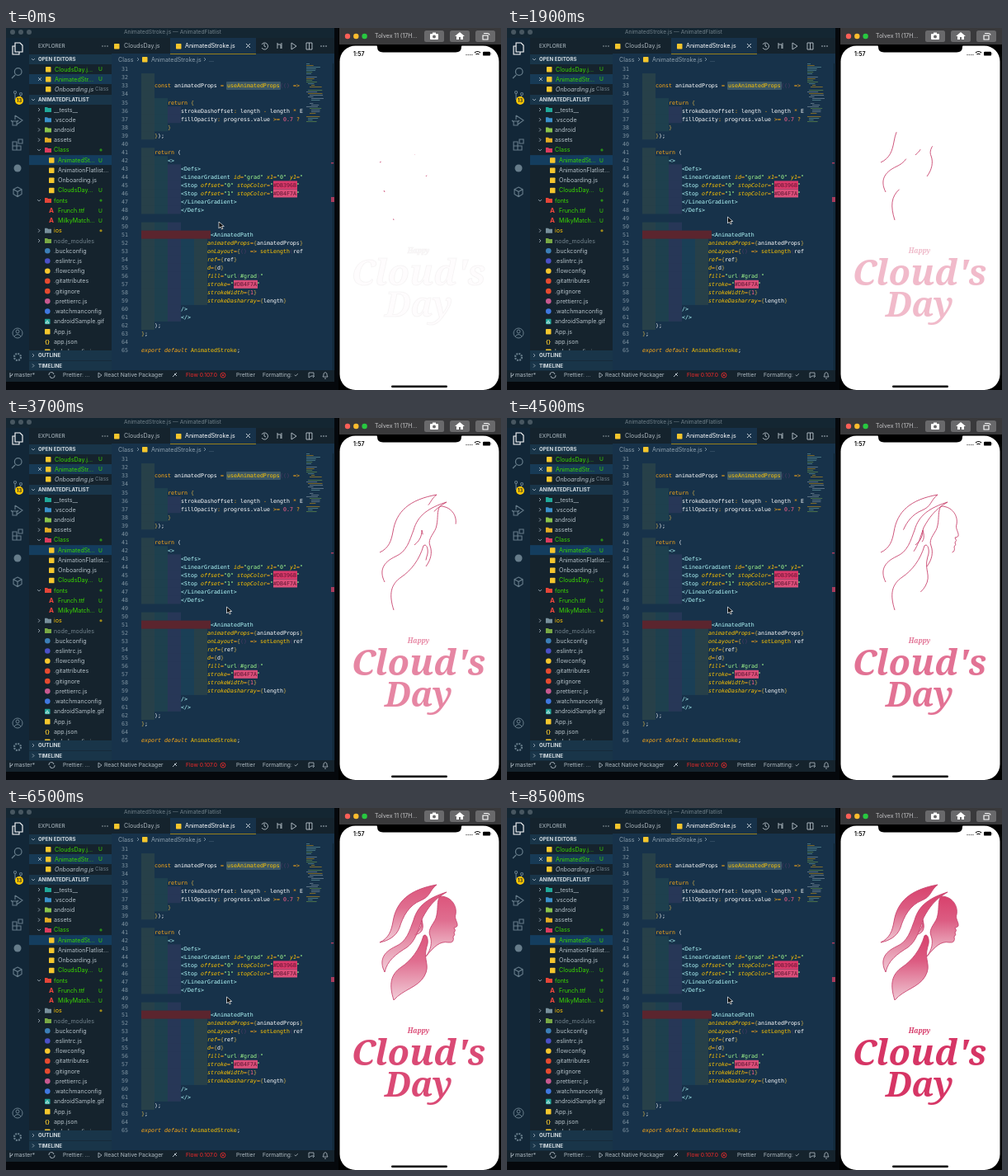
An HTML page that plays this animation: 600x439 px, repeating every 8600 ms.

```html
<!DOCTYPE html>
<html lang="en">
<head>
<meta charset="utf-8">
<title>Stroke animation</title>
<style>
  html, body { margin: 0; width: 100%; height: 100%; overflow: hidden; background: #05080c; }
  svg { display: block; width: 100vw; height: 100vh; }
  text { font-family: Inter, sans-serif; white-space: pre; }
  .code { font-family: "DejaVu Sans Mono", monospace; }
  .script { font-family: "Noto Serif", serif; font-style: italic; font-weight: 900; text-anchor: middle; }
</style>
</head>
<body>
<svg id="stage" viewBox="0 0 600 439">
  <defs>
    <linearGradient id="grad" x1="0" y1="0" x2="0" y2="1">
      <stop offset="0" stop-color="#d8416c"/>
      <stop offset=".4" stop-color="#dc5c82"/>
      <stop offset="1" stop-color="#f0c8d4"/>
    </linearGradient>
    <clipPath id="codeClip"><path d="M128 43H360V415H128z"/></clipPath>
  </defs>
</svg>
<script>
const LOOP = 8600, STEP = 100;
const stage = document.getElementById('stage');

function el(tag, attrs, parent = stage) {
  const node = document.createElementNS(stage.namespaceURI, tag);
  for (const key in attrs) node.setAttribute(key, attrs[key]);
  return parent.appendChild(node);
}
const rect = (x, y, width, height, fill, rx = 0, parent) =>
  el('rect', { x, y, width, height, fill, rx }, parent);
const dot = (cx, cy, r, fill) => el('circle', { cx, cy, r, fill });
const line = (d, stroke, width = 1, extra = {}, parent) =>
  el('path', { d, stroke, 'stroke-width': width, fill: 'none', ...extra }, parent);
// y is the vertical middle of the text
function label(x, y, string, fill, size = 7.1, extra = {}, parent) {
  const node = el('text', { x, y: y + size * .36, fill, 'font-size': size, ...extra }, parent);
  node.textContent = string;
  return node;
}
const bold = { 'font-weight': 700 };
const italic = { 'font-style': 'italic' };
const chevron = (x, y, open, color = '#a9b7c0') =>
  line(open ? `M${x - 2} ${y - 1}l2 2l2 -2` : `M${x - 1} ${y - 2}l2 2l-2 2`, color, .8);

function drawWindow() {
  rect(0, 0, 398, 429, '#15232d');
  rect(0, 0, 398, 12, '#142632');
  rect(0, 12, 28, 403, '#122738');
  rect(128, 31, 270, 384, '#17324a');
  rect(199, 12, 104, 19, '#17324a');
  rect(199, 31, 104, .8, '#b8940f');
  [8, 18, 28].forEach(x => dot(x, 5, 3, '#485761'));
  label(202, 5, 'AnimatedStroke.js — AnimatedFlatlist', '#71808a', 6.7, { 'text-anchor': 'middle' });

  fileIcon(131, 22, 'js');
  label(143, 21.5, 'CloudsDay.js', '#aab4bb');
  fileIcon(206, 22, 'js');
  label(217, 21.5, 'AnimatedStroke.js', '#fff');
  line('M291 19l5 5m0 -5l-5 5', '#dde5ea', .9);

  const ink = '#b9c4cc';
  line('M310 20a4 4 0 1 1 0 4M313 19v3l2 1', ink, .9);
  line('M329 18v7m0 -5h4v5M334 18v7', ink, .9);
  line('M346 18l6 4l-6 4z', ink, .9);
  line('M364 18h7v8h-7zM367.5 18v8', ink, .9);
  [382, 385, 388].forEach(x => dot(x, 22, .8, ink));

  label(136, 38, 'Class', '#8fa1ae');
  chevron(160, 38, false, '#8fa1ae');
  fileIcon(165, 38, 'js');
  label(176, 38, 'AnimatedStroke.js', '#8fa1ae');
  chevron(241, 38, false, '#8fa1ae');
  label(246, 38, '...', '#8fa1ae');
}

function drawActivityBar() {
  const ink = '#667c8a';
  line('M11 18h6l3 3v8h-9zM11 22h-3v10h8v-3', '#fff', 1.1);
  line('M11 57l-4 4M19 53a4.3 4.3 0 1 1 -8.6 0a4.3 4.3 0 1 1 8.6 0', ink, 1.2);
  line('M11 79v8M18 81q0 4 -7 4M9.5 78a1.5 1.5 0 1 1 3 0a1.5 1.5 0 1 1 -3 0M16.5 80a1.5 1.5 0 1 1 3 0a1.5 1.5 0 1 1 -3 0', ink, 1.1);
  dot(16, 88, 5, '#ffc600');
  label(16, 88, '13', '#15232d', 5.6, { ...bold, 'text-anchor': 'middle' });
  line('M11 106l9 6l-7 5M11 106v5M8 113h5v5h-5zM6 112l2 2M15 112l-2 2', ink, 1.1);
  line('M8 138h5v5h5v5h-10zM13 143h-5M13 143v5M15 135h5v5h-5z', ink, 1.1);
  dot(14, 170, 4.5, ink);
  line('M14 193l5 2.5v6l-5 3l-5 -3v-6zM9 195.5l5 3l5 -3M14 198.5v6', ink, 1.1);
  line('M20 370a6 6 0 1 1 -12 0a6 6 0 1 1 12 0M16 368a2 2 0 1 1 -4 0a2 2 0 1 1 4 0M10 374q4 -5 8 0', ink, 1);
  line('M18 399a4 4 0 1 1 -8 0a4 4 0 1 1 8 0', ink, 2.2, { 'stroke-dasharray': '2 1.1' });
  dot(14, 399, 2, '#122738');
}

// kind is a file type, "dot#colour" for a round mark or a folder colour
function fileIcon(x, y, kind) {
  if (kind === 'js') return rect(x, y - 3, 6.5, 6.5, '#f5c62d', .7);
  if (kind === 'font') return label(x, y, 'A', '#f0473c', 8, bold);
  if (kind === 'image') {
    rect(x, y - 3, 6.5, 6.5, '#25a699', .8);
    return line(`M${x + 1} ${y + 2}l2 -3l2 3z`, '#fff', .7);
  }
  if (kind === 'json') return label(x, y, '{}', '#f5c62d', 6.5, bold);
  if (kind.startsWith('dot')) return dot(x + 3.3, y, 3.3, kind.slice(3));
  el('path', { d: `M${x} ${y - 3}h3l1 1h4v5h-8z`, fill: kind });
}

function drawSidebar() {
  const green = '#3ad900', grey = '#b4c0c8';
  label(39, 22, 'EXPLORER', grey, 6.4);
  [117, 120, 123].forEach(x => dot(x, 22, .7, grey));
  const header = (y, title, open) => {
    rect(28, y - 6, 100, 12, '#193549');
    chevron(33, y, open);
    label(39, y, title, '#d5dde2', 6.2, bold);
  };
  header(38, 'OPEN EDITORS', true);
  rect(28, 56, 100, 12, '#173a55');
  line('M39 60l4 4m0 -4l-4 4', grey, .8);
  const openFile = (y, name, color, extra) => {
    fileIcon(48, y, 'js');
    label(59, y, name, color, 7.1, extra);
  };
  openFile(50, 'CloudsDay.j...', green);
  openFile(62, 'AnimatedStr...', green);
  openFile(74, 'Onboarding.js', grey, italic);
  label(112, 50, 'U', green, 6.6);
  label(112, 62, 'U', green, 6.6);
  label(108, 74, 'Class', '#72838f', 6.3);
  header(87, 'ANIMATEDFLATLIST', true);

  // indent, icon, name, colour, git mark
  const rows = [
    [0, '#20a89a', '__tests__'], [0, '#3990c9', '.vscode'], [0, '#8bc34a', 'android'],
    [0, '#e5ac23', 'assets'], [0, '#dd3b5d', 'Class', green, 'dot'],
    [1, 'js', 'AnimatedSt...', green, 'U'], [1, 'js', 'AnimationFlatlist...'],
    [1, 'js', 'Onboarding.js'], [1, 'js', 'CloudsDay...', green, 'U'],
    [0, '#e64538', 'fonts', green, 'dot'], [1, 'font', 'Frunch.ttf', green, 'U'],
    [1, 'font', 'MilkyMatch...', green, 'U'], [0, '#78909c', 'ios', '#ffc600', 'dot'],
    [0, '#78a844', 'node_modules', '#71818b'], [0, 'dot#3c7fb8', '.buckconfig'],
    [0, 'dot#4b50c8', '.eslintrc.js'], [0, 'dot#f5c62d', '.flowconfig'],
    [0, 'dot#e64a30', '.gitattributes'], [0, 'dot#e64a30', '.gitignore'],
    [0, 'dot#c9598f', '.prettierrc.js'], [0, 'dot#3f78e0', '.watchmanconfig'],
    [0, 'image', 'androidSample.gif'], [0, 'js', 'App.js'], [0, 'json', 'app.json'],
    [0, 'js', 'babel.config.js']
  ];
  rows.forEach(([indent, icon, name, color = grey, mark], i) => {
    const y = 99 + i * 12.23;
    if (i === 5) rect(28, y - 6, 100, 12, '#143d5e');
    if (icon[0] === '#') chevron(40, y, name === 'Class' || name === 'fonts');
    fileIcon(indent ? 52 : 47, y, icon);
    label(indent ? 63 : 58, y, name, color);
    if (mark === 'U') label(112, y, 'U', green, 6.6);
    if (mark === 'dot') dot(115, y, 1.6, color === green ? '#288d17' : '#a28b18');
  });
  header(397, 'OUTLINE', false);
  rect(28, 403, 100, .8, '#15232d');
  header(409.5, 'TIMELINE', false);
}

const CODE = [
  [0, ''], [4, ''],
  [4, 'const animatedProps = useAnimatedProps(() => {'], [4, ''],
  [8, 'return {'],
  [12, 'strokeDashoffset: length - length * Easing'],
  [12, 'fillOpacity: progress.value >= 0.7 ? '],
  [8, '}'], [4, '});'], [0, ''],
  [4, 'return ('], [8, '<>'], [12, '<Defs>'],
  [12, '<LinearGradient id="grad" x1="0" y1="0"'],
  [12, '<Stop offset="0" stopColor="#DB396B"'],
  [12, '<Stop offset="1" stopColor="#DB4F7A"'],
  [12, '</LinearGradient>'], [12, '</Defs>'], [0, ''], [12, ''],
  [21, '<AnimatedPath'],
  [20, 'animatedProps={animatedProps}'], [20, 'onLayout={() => setLength(ref.current'],
  [20, 'ref={ref}'], [20, 'd={d}'], [20, 'fill="url(#grad)"'], [20, 'stroke="#DB4F7A"'],
  [20, 'strokeWidth={1}'], [20, 'strokeDasharray={length}'],
  [12, '/>'], [12, '</>'], [4, ');'], [0, '};'], [0, ''],
  [0, 'export default AnimatedStroke;']
];
const TOKENS = [
  [/^#[0-9A-F]{6}/, '#5d1632'],
  [/^"[^"#(]*"|^"(url)?|^#grad/, '#a5ff90'],
  [/^(const|return|export|default)\b/, '#ffa916'],
  [/^(useAnimatedProps|setLength|AnimatedStroke)/, '#ffc600'],
  [/^<\/?\w*>?|^\/?>(?!=)/, '#b4ffff'],
  [/^\w+(?==["{])/, '#ffc600'],
  [/^(=>|>=|[-=*?:])/, '#ffa916'],
  [/^\d[\d.]*/, '#ff628c'],
  [/^\);|^\($/, '#fff'],
  [/^[()]/, '#4f3a66'],
  [/^[{}]/, '#c9a94a'],
  [/^\w+|^[^]/, '#fff']
];

function drawCode() {
  const COL = 4, LEFT = 164, PITCH = 10.03, SIZE = 6.645;
  const bands = ['255,255,64', '127,255,127', '255,127,255', '79,236,236'];
  const group = el('g', { 'clip-path': 'url(#codeClip)' });
  rect(267, 65, 66, 10, '#3a5666', 1, group);
  CODE.forEach(([indent, source], i) => {
    const y = 50 + i * PITCH;
    label(140, y, String(31 + i), '#8296a3', SIZE, { class: 'code' }, group);
    if (indent % 4) rect(LEFT, y - 5, indent * COL, PITCH, 'rgba(128,32,32,.65)', 0, group);
    else for (let c = 0; c < indent; c += 4) {
      rect(LEFT + c * COL, y - 5, 4 * COL, PITCH, `rgba(${bands[c / 4 % 4]},.07)`, 0, group);
    }
    let col = indent, rest = source;
    while (rest) {
      const [pattern, color] = TOKENS.find(([p]) => p.test(rest));
      const word = rest.match(pattern)[0], x = LEFT + col * COL;
      if (/^#[0-9A-F]{6}/.test(word)) rect(x, y - 5, word.length * COL + 1, PITCH, word.toLowerCase(), 0, group);
      const slanted = /^\w+=/.test(rest) || /^(export|default)/.test(word);
      label(x, y, word, color, SIZE, { class: 'code', ...(slanted ? italic : {}) }, group);
      col += word.length;
      rest = rest.slice(word.length);
    }
  });
}

function drawMinimap() {
  let seed = 11;
  const random = () => (seed = seed * 16807 % 2147483647) / 2147483647;
  const colors = ['#8d7329', '#4d7d87', '#527a4c', '#64798a'];
  for (let i = 0; i < 36; i++) {
    if (i % 8 === 7) continue;
    const x = 364 + (i < 12 ? 0 : Math.floor(random() * 4) * 2);
    rect(x, 43 + i * 2, 4 + random() * 15, .9, colors[Math.floor(random() * 4)]);
  }
  rect(396, 43, 1, 372, '#102532');
  rect(394, 163, 3, 1.5, '#a83c5d');
  rect(394, 205, 4, 6, '#a83c5d');
}

function drawStatusBar() {
  const ink = '#b0bcc4', y = 421;
  const item = (x, string, color = ink) => label(x, y, string, color, 6.7);
  line('M5 418v6M8 419q0 3 -3 3', ink, .9);
  item(10, 'master*');
  line('M52 421a3 3 0 0 1 6 -1M59 421a3 3 0 0 1 -6 1', ink, .9);
  item(69, 'Prettier: ...');
  line('M112 418l4 3l-4 3z', ink, .8);
  item(119, 'React Native Packager');
  line('M202 423l5 -5M204 419l3 3', ink, 1);
  item(218, 'Flow 0.107.0', '#f22a2a');
  line('M266 421a3 3 0 1 1 -6 0a3 3 0 1 1 6 0M261.8 419.8l2.4 2.4m0 -2.4l-2.4 2.4', '#f22a2a', .8);
  item(279, 'Prettier');
  item(311, 'Formatting: ✓');
  line('M367 418h6v4h-3l-3 2zM372 424l2 -2', ink, .8);
  line('M384 423h6l-1 -2v-2q-2 -3 -4 0v2zM386 425h2', ink, .8);
}

function drawPhone() {
  rect(403, 0, 197, 439, '#000');
  rect(404, 0, 196, 20, '#39393b');
  ['#ff5f57', '#febc2e', '#28c840'].forEach((color, i) => dot(414 + i * 10.3, 10, 3.2, color));
  label(447, 10, 'Tolvex 11 (17H...', '#b4b4b6', 6.9, { 'font-weight': 500 });
  [507, 538, 569].forEach(x => rect(x, 3, 24, 14, '#69696b', 2.5));
  rect(514, 7, 10, 7, '#fff', 1);
  rect(517, 5.5, 4, 2, '#fff');
  dot(519, 10.5, 2, '#69696b');
  el('path', { d: 'M550 5l6 5h-2v4h-3v-3h-2v3h-3v-4h-2z', fill: '#fff' });
  line('M578 9h6v5h-6zM579 6.5h4q3 0 3 2', '#fff', 1.1);

  rect(404.5, 21.5, 193, 417.5, '#fff', 19);
  el('path', { d: 'M447 20h108q-3 0 -3 3q0 6.5 -7 6.5h-88q-7 0 -7 -6.5q0 -3 -3 -3z', fill: '#000' });
  label(421, 31, '1:57', '#000', 7, { 'font-weight': 600 });
  [558, 560.3, 562.6, 564.9].forEach(x => dot(x, 32.5, .7, '#555'));
  line('M568 30q3.5 -3 7 0M569.5 32q2 -1.6 4 0', '#000', 1.1);
  rect(578, 28.8, 9, 4.8, '#000', 1.2);
  rect(587.5, 30.3, .8, 1.8, '#777');
  rect(467, 433.5, 68, 2.5, '#000', 1.2);
}

drawWindow();
drawActivityBar();
drawSidebar();
drawCode();
drawMinimap();
drawStatusBar();
drawPhone();

const strands = [
  'M453 163C464 158 467 149 469 138C473 113 489 99 522 93C513 100 515 107 503 112C488 118 481 132 477 145C473 156 463 161 453 163Z',
  'M495 154C501 149 504 144 504 136C507 146 505 152 495 154Z',
  'M509 180C515 172 517 163 514 155C510 146 521 139 522 130C524 121 522 113 526 107C540 107 547 119 545 129C543 134 548 139 547 143Q546 145 543 145Q546 149 543 151Q545 154 542 156Q544 164 536 163C526 161 519 168 509 180Z',
  'M459 199C452 185 457 175 472 168C486 162 489 149 494 136C499 118 512 109 534 102C518 111 511 122 505 133C500 148 496 162 486 169C473 177 462 185 459 199Z',
  'M470 233C464 214 466 202 479 193C491 185 501 172 506 155C510 151 513 161 510 168C505 185 515 190 507 204C499 218 481 220 470 233Z'
].map(d => line(d, '#c9446f', .9, { pathLength: 1, 'stroke-linejoin': 'round' }));

const greeting = el('g', { fill: '#d63565' });
[['Happy', 273, 8], ['Cloud\'s', 312, 43], ['Day', 350, 41]].forEach(([string, y, size]) => {
  el('text', { x: 500, y, 'font-size': size, class: 'script' }, greeting).textContent = string;
});

const pointer = el('path', { d: 'M0 0v8l2 -2l1.5 3l1.4 -.7l-1.4 -2.8h2.8z', fill: '#000', stroke: '#fff', 'stroke-width': .7 });

const clamp = v => Math.max(0, Math.min(1, v));
const smooth = v => v * v * (3 - 2 * v);

function render(ms) {
  const drawn = clamp(.008 + (ms / 5200) ** 1.6);
  const filled = .88 * clamp((ms - 5500) / 850) + .12 * clamp((ms - 6400) / 1200);
  strands.forEach(strand => {
    strand.setAttribute('stroke-dasharray', drawn < 1 ? `${drawn} 2` : 'none');
    strand.setAttribute('fill', filled ? 'url(#grad)' : 'none');
    strand.setAttribute('fill-opacity', filled);
  });
  greeting.setAttribute('fill-opacity', .015 + .985 * (1 - (1 - ms / LOOP) ** 1.6));
  greeting.setAttribute('stroke', `rgba(90,70,85,${.05 * clamp(1 - ms / 2500)})`);
  const move = smooth(clamp((ms - 100) / 700));
  pointer.setAttribute('transform', `translate(${258 + 9.5 * move} ${235 - 6 * move})`);
}

function tick() {
  render(Math.floor(performance.now() % LOOP / STEP) * STEP);
  requestAnimationFrame(tick);
}
tick();
</script>
</body>
</html>
```
